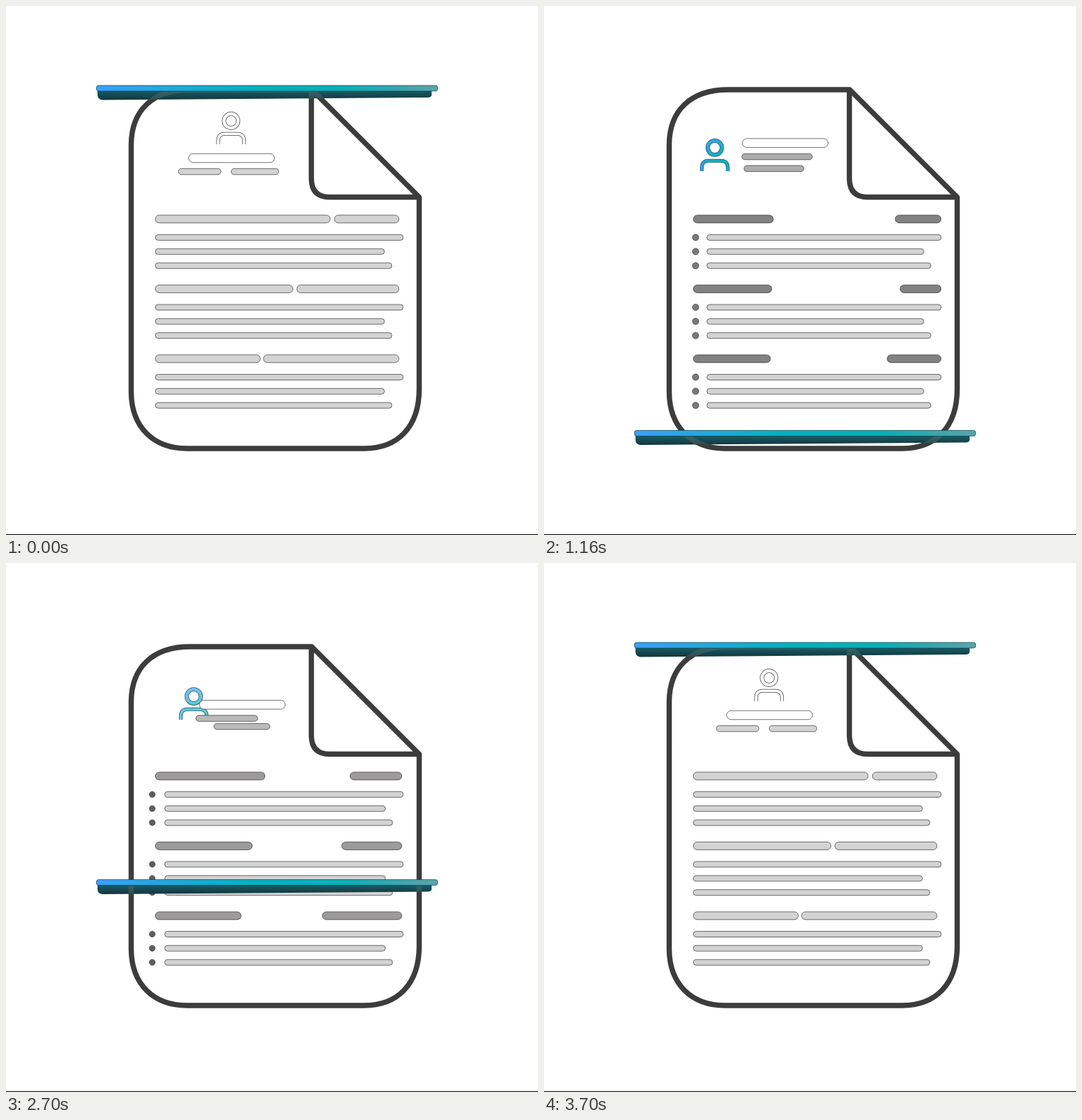
An HTML page with a canvas for the animation above (3740 ms loop, 750x746 px).

```html
<!DOCTYPE html>
<html lang="en">
<head>
<meta charset="utf-8">
<title>Document scan</title>
<style>
  html, body { margin: 0; width: 100%; height: 100%; overflow: hidden; background: #fff; }
  canvas { display: block; }
</style>
</head>
<body>
<canvas id="stage" width="750" height="746"></canvas>
<script>
const ctx = document.getElementById('stage').getContext('2d');
const LOOP = 3740;
const DOWN = { start: 510, length: 874 };
const UP = { start: 2117, length: 948 };
const INK = '#3c3c3c';
const EDGE = 'rgba(35,35,35,0.8)';

const mix = (a, b, p) => a + (b - a) * p;
const clamp = v => Math.min(1, Math.max(0, v));
const mixColor = (a, b, p) => `rgb(${a.map((v, i) => Math.round(mix(v, b[i], p))).join(',')})`;
const gray = (a, b, p) => mixColor([a, a, a], [b, b, b], p);

// The standard "ease" curve: cubic-bezier(.25, .1, .25, 1)
function ease(x) {
  if (x <= 0 || x >= 1) return clamp(x);
  const at = (a, b, s) => 3 * a * s * (1 - s) ** 2 + 3 * b * s * s * (1 - s) + s ** 3;
  let lo = 0, hi = 1;
  for (let i = 0; i < 24; i++) {
    const mid = (lo + hi) / 2;
    if (at(0.25, 0.25, mid) < x) lo = mid; else hi = mid;
  }
  return at(0.1, 1, lo);
}

function progressAt(t) {
  return t < UP.start
    ? ease((t - DOWN.start) / DOWN.length)
    : ease(1 - (t - UP.start) / UP.length);
}

function gradient(x0, y0, x1, y1, ...stops) {
  const g = ctx.createLinearGradient(x0, y0, x1, y1);
  stops.forEach(([pos, color]) => g.addColorStop(pos, color));
  return g;
}

function pill(left, right, cy, height, fill) {
  ctx.beginPath();
  ctx.roundRect(left + 0.5, cy - height / 2 + 0.5, right - left - 1, height - 1, height / 2);
  ctx.fillStyle = fill;
  ctx.fill();
  ctx.strokeStyle = EDGE;
  ctx.lineWidth = 0.8;
  ctx.stroke();
}

function outlinePath() {
  ctx.beginPath();
  ctx.moveTo(582.5, 269.5);
  ctx.lineTo(431, 118);
  ctx.lineTo(260, 118);
  ctx.bezierCurveTo(206, 118, 177, 148, 176.5, 195);
  ctx.lineTo(176.5, 545);
  ctx.bezierCurveTo(177, 594, 208, 624, 255, 624);
  ctx.lineTo(505, 624);
  ctx.bezierCurveTo(552, 624, 582.5, 594, 582.5, 540);
  ctx.closePath();
  ctx.moveTo(430.5, 120);
  ctx.lineTo(430.5, 244);
  ctx.quadraticCurveTo(431, 269.5, 456, 269.5);
  ctx.lineTo(582.5, 269.5);
}

function strokeOutline(color) {
  outlinePath();
  ctx.lineWidth = 7.4;
  ctx.lineJoin = 'round';
  ctx.lineCap = 'butt';
  ctx.strokeStyle = color;
  ctx.stroke();
}

// Per section: right end of the left heading, left end of the right heading (before, after)
const SECTIONS = [
  { leftEnd: 457.5, rightStart: [462.5, 496] },
  { leftEnd: 405, rightStart: [409.5, 505.5] },
  { leftEnd: 359, rightStart: [362.5, 488.5] },
];
const LINE_ENDS = [[560.5, 560.5], [534, 536], [544.5, 546]];

function drawBody(p) {
  const heading = mixColor([211, 211, 211], [128, 125, 125], p);
  SECTIONS.forEach(({ leftEnd, rightStart }, i) => {
    const y = 300.4 + i * 98.5;
    pill(210, mix(leftEnd, 318, p), y, 12, heading);
    pill(mix(...rightStart, p), mix(554.5, 560.5, p), y, 12, heading);
    LINE_ENDS.forEach((ends, j) => {
      const lineY = y + 26 + j * 19.9;
      pill(mix(210, 230, p), mix(...ends, p), lineY, 9, '#d3d3d3');
      if (p < 0.02) return;
      ctx.beginPath();
      ctx.arc(mix(189.5, 214.8, p), lineY, mix(3.2, 4.6, p), 0, Math.PI * 2);
      ctx.fillStyle = gray(38, 125, p);
      ctx.fill();
      ctx.strokeStyle = EDGE;
      ctx.lineWidth = 0.7;
      ctx.stroke();
    });
  });
}

function drawAvatar(p) {
  const x = mix(317.3, 237.5, p), y = mix(162, 201.5, p);
  const blue = mixColor([255, 255, 255], [52, 156, 240], p);
  const teal = mixColor([255, 255, 255], [4, 174, 190], p);

  const head = new Path2D();
  head.arc(x, y, 10, 0, Math.PI * 2);
  const body = new Path2D();
  body.moveTo(x - 18.3, y + 33);
  body.lineTo(x - 18.3, y + 28);
  body.quadraticCurveTo(x - 18, y + 18.3, x - 9, y + 18.3);
  body.lineTo(x + 9, y + 18.3);
  body.quadraticCurveTo(x + 18, y + 18.3, x + 18.3, y + 28);
  body.lineTo(x + 18.3, y + 33);

  ctx.lineCap = 'butt';
  const paint = (path, width, fill) => {
    ctx.lineWidth = width;
    ctx.strokeStyle = mixColor([70, 70, 70], [20, 85, 105], p);
    ctx.stroke(path);
    ctx.lineWidth = width - 1.5;
    ctx.strokeStyle = fill;
    ctx.stroke(path);
  };
  paint(head, 5.8, gradient(x - 5, y - 12, x + 5, y + 13, [0, blue], [1, teal]));
  paint(body, 5, gradient(x - 20, y + 33, x + 20, y + 17, [0, blue], [0.45, teal], [1, teal]));
}

function drawHeader(p) {
  const tone = gray(211, 171, p);
  drawAvatar(p);
  pill(mix(257, 280, p), mix(379, 402, p), mix(214.5, 192.3, p), 13.5, '#fff');
  pill(mix(242.5, 280, p), mix(303.5, 382, p), mix(233.5, 211.6, p), 9.5, tone);
  pill(mix(317, 280, p), mix(385, 366, p), mix(233.5, 229, p), 9.5, tone);
}

function drawScanner(p) {
  const y = mix(116, 623.5, p);

  ctx.save();
  ctx.beginPath();
  ctx.moveTo(129, y + 3);
  ctx.lineTo(600, y + 3);
  ctx.lineTo(600, y + 10);
  ctx.quadraticCurveTo(599, y + 13, 595, y + 13);
  ctx.lineTo(136, y + 16.5);
  ctx.quadraticCurveTo(129, y + 16, 129, y + 9);
  ctx.closePath();
  ctx.fillStyle = gradient(0, y + 4, 0, y + 17, [0, '#175c65'], [0.5, '#16474f'], [1, '#12363c']);
  ctx.fill();
  ctx.clip();
  strokeOutline('rgba(90,106,108,0.45)');
  ctx.restore();

  ctx.beginPath();
  ctx.roundRect(127.5, y - 4, 481, 8, 3);
  ctx.fillStyle = gradient(127, 0, 609, 0,
    [0, '#3c9ffa'], [0.15, '#2ba5e4'], [0.45, '#04b2bf'], [0.72, '#08b0b8'], [0.88, '#3ba5ad'], [1, '#5aa5ab']);
  ctx.fill();
  ctx.strokeStyle = 'rgba(15,60,70,0.75)';
  ctx.lineWidth = 0.9;
  ctx.stroke();
}

function draw(t) {
  const p = progressAt(t);
  ctx.fillStyle = '#fff';
  ctx.fillRect(0, 0, 750, 746);
  strokeOutline(INK);
  drawBody(p);
  drawScanner(p);
  drawHeader(p);
  ctx.fillStyle = '#000';
  ctx.fillRect(0, 745, 750, 1);
}

const origin = performance.now();
function tick() {
  draw((performance.now() - origin) % LOOP);
  requestAnimationFrame(tick);
}
tick();
</script>
</body>
</html>
```
